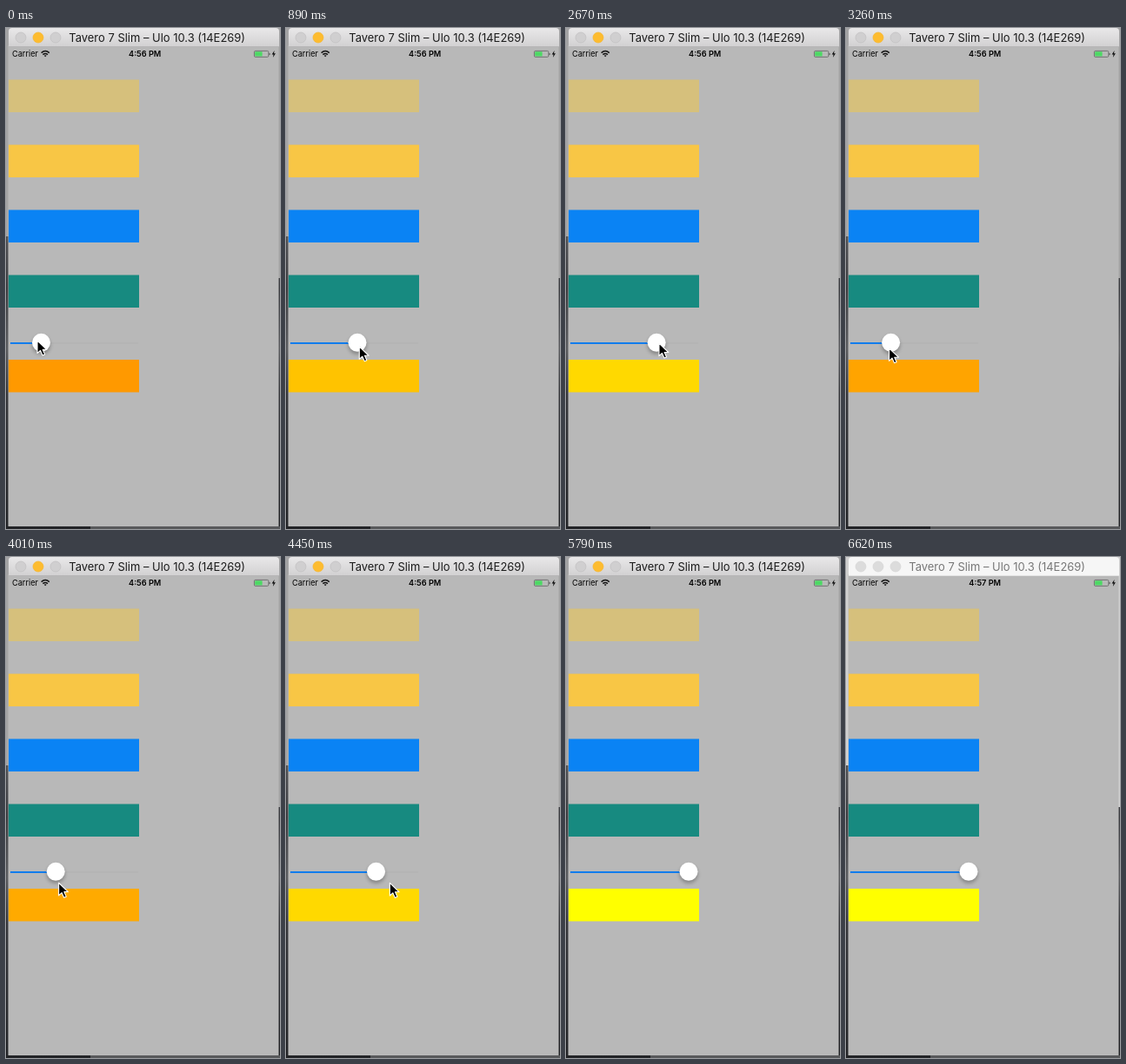
An HTML page for the animation above (6640 ms loop, 315 by 577 pixels).

```html
<!DOCTYPE html>
<html lang="en">
<head>
<meta charset="utf-8">
<title>Slider color</title>
<style>
  html, body { margin: 0; width: 100%; height: 100%; overflow: hidden; background: #b8b8b8; }
  svg { display: block; width: 100vw; height: 100vh; --sky: #a4a4a5; --rule: #b0b0b0; --light: #d0cfd0; --ring: #c0bfc0; }
  svg.inactive { --sky: #d0d0d0; --rule: #dedede; --light: #dcdcdc; --ring: #d6d6d6; }
  text { font-family: Inter, "Open Sans", sans-serif; text-anchor: middle; }
  .sky { fill: var(--sky); }
  #titleBar { fill: url(#activeBar); }
  #title { fill: #1c1c1c; }
  #rule { stroke: var(--rule); }
  #lights circle { fill: var(--light); stroke: var(--ring); }
  #lights circle.lit { fill: #fdbc30; stroke: #f6b52d; }
  .inactive #titleBar { fill: #f6f6f6; }
  .inactive #title { fill: #777; }
  .inactive #lights circle.lit { fill: var(--light); stroke: var(--ring); }
</style>
</head>
<body>
<svg id="stage" viewBox="0 0 315 577">
  <defs>
    <linearGradient id="rocks" x2="0" y2="1">
      <stop stop-color="#55565a"/>
      <stop offset=".2" stop-color="#3c3d41"/>
      <stop offset=".4" stop-color="#5c5d60"/>
      <stop offset=".55" stop-color="#37383c"/>
      <stop offset="1" stop-color="#222326"/>
    </linearGradient>
    <linearGradient id="activeBar" x2="0" y2="1">
      <stop stop-color="#e9e8e9"/>
      <stop offset="1" stop-color="#d1d0d1"/>
    </linearGradient>
    <filter id="blur" x="-50%" y="-50%" width="200%" height="200%"><feGaussianBlur stdDeviation="2.2"/></filter>
  </defs>

  <rect y="230" width="315" height="347" fill="url(#rocks)"/>
  <rect class="sky" width="300" height="240"/>
  <rect class="sky" x="300" width="15" height="288"/>
  <rect x="97" y="574" width="218" height="3" fill="#58595b"/>
  <rect x="2.5" y="20" width="311" height="554" fill="#b8b8b8"/>

  <path id="titleBar" d="M3 22V4Q3 0 7 0H310Q314 0 314 4V22Z"/>
  <path id="rule" d="M3 21.5H314" stroke-width=".8"/>
  <g id="lights" stroke-width=".7">
    <circle cx="17" cy="11" r="6"/>
    <circle cx="37" cy="11" r="6" class="lit"/>
    <circle cx="57" cy="11" r="6"/>
  </g>
  <text id="title" x="173.7" y="16" font-size="12.95">Tavero 7 Slim – Ulo 10.3 (14E269)</text>

  <text x="22" y="33" font-size="9.2">Carrier</text>
  <g fill="none" stroke="#111" stroke-width="1.4">
    <path d="M40.6 28.6Q45.2 24.6 49.8 28.6M42.4 30.6Q45.2 28.2 48 30.6"/>
    <path d="M45.2 33.3L43.7 31.8Q45.2 30.7 46.7 31.8Z" fill="#111" stroke="none"/>
  </g>
  <text id="clock" x="159.7" y="33" font-size="9.2" font-weight="600"></text>
  <rect x="285.4" y="26.4" width="16.4" height="7" rx="1.3" fill="none" stroke="#555" stroke-width=".7"/>
  <rect x="286.2" y="27.2" width="8.4" height="5.4" rx=".5" fill="#4cd964"/>
  <path d="M302.6 28.7v2.6q1-.3 1-1.3t-1-1.3z" fill="#333"/>
  <path d="M308.6 26L305.6 30.4H307.5L306.9 34L309.9 29.3H308Z" fill="#111"/>

  <rect x="3" y="59.5" width="150" height="37.5" fill="#d6c07c"/>
  <rect x="3" y="134.5" width="150" height="37.5" fill="#f8c645"/>
  <rect x="3" y="209.5" width="150" height="37.5" fill="#0a83f4"/>
  <rect x="3" y="284.5" width="150" height="37.5" fill="#178a80"/>
  <rect id="swatch" x="3" y="382" width="150" height="37.5"/>

  <path d="M5 363H152" stroke="#b3b3b3" stroke-width="1.3"/>
  <path id="track" stroke="#117cec" stroke-width="2"/>
  <g id="thumb">
    <circle cy="3" r="10.5" opacity=".28" filter="url(#blur)"/>
    <circle r="10.5" fill="#fff"/>
  </g>
  <path id="cursor" d="M0 0V14.6L3.5 11.4L6 17L8.6 15.9L6.2 10.4H10.8Z" stroke="#fff" stroke-width="1.1" stroke-linejoin="round"/>
</svg>

<script>
const LOOP = 6640, STEP = 148.4, INACTIVE_AT = 6620;
const EXIT_STEP = 38;
const $ = id => document.getElementById(id);

// Turning points of the drag, as [step, x].
const thumbTurns = [[0, 40.5], [13.5, 141], [24.4, 40], [34, 141]];
const cursorTurns = [[0, 36], [13.3, 150], [24.4, 37], [33, 150], [34, 170]];

const easeInOut = t => (1 - Math.cos(Math.PI * t)) / 2;

function swing(turns, step) {
  const next = turns.findIndex(turn => turn[0] > step);
  if (next < 0) return turns[turns.length - 1][1];
  const [from, x0] = turns[next - 1], [to, x1] = turns[next];
  return x0 + (x1 - x0) * easeInOut((step - from) / (to - from));
}

function cursorPosition(step) {
  const dragged = Math.min(step, 34);
  const x = swing(cursorTurns, step);
  const y = 360 + 0.4 * dragged + 4.5 * Math.sin(dragged * Math.PI / 11);
  return step < EXIT_STEP ? [x, y] : [x + 21, y + 53];
}

function draw(time) {
  const step = Math.floor((time + 8) / STEP);
  const x = swing(thumbTurns, step);
  const green = Math.min(255, Math.round(152.5 + (x - 40.5) * 1.02));
  const inactive = time >= INACTIVE_AT;

  $('thumb').setAttribute('transform', `translate(${x} 362.3)`);
  $('track').setAttribute('d', `M5 363H${x}`);
  $('swatch').setAttribute('fill', `rgb(255,${green},0)`);
  $('cursor').setAttribute('transform', `translate(${cursorPosition(step)})`);
  $('cursor').setAttribute('visibility', step <= EXIT_STEP ? 'visible' : 'hidden');
  $('stage').classList.toggle('inactive', inactive);
  $('clock').textContent = inactive ? '4:57 PM' : '4:56 PM';
}

const start = performance.now();
function tick() {
  draw((performance.now() - start) % LOOP);
  requestAnimationFrame(tick);
}
tick();
</script>
</body>
</html>
```
